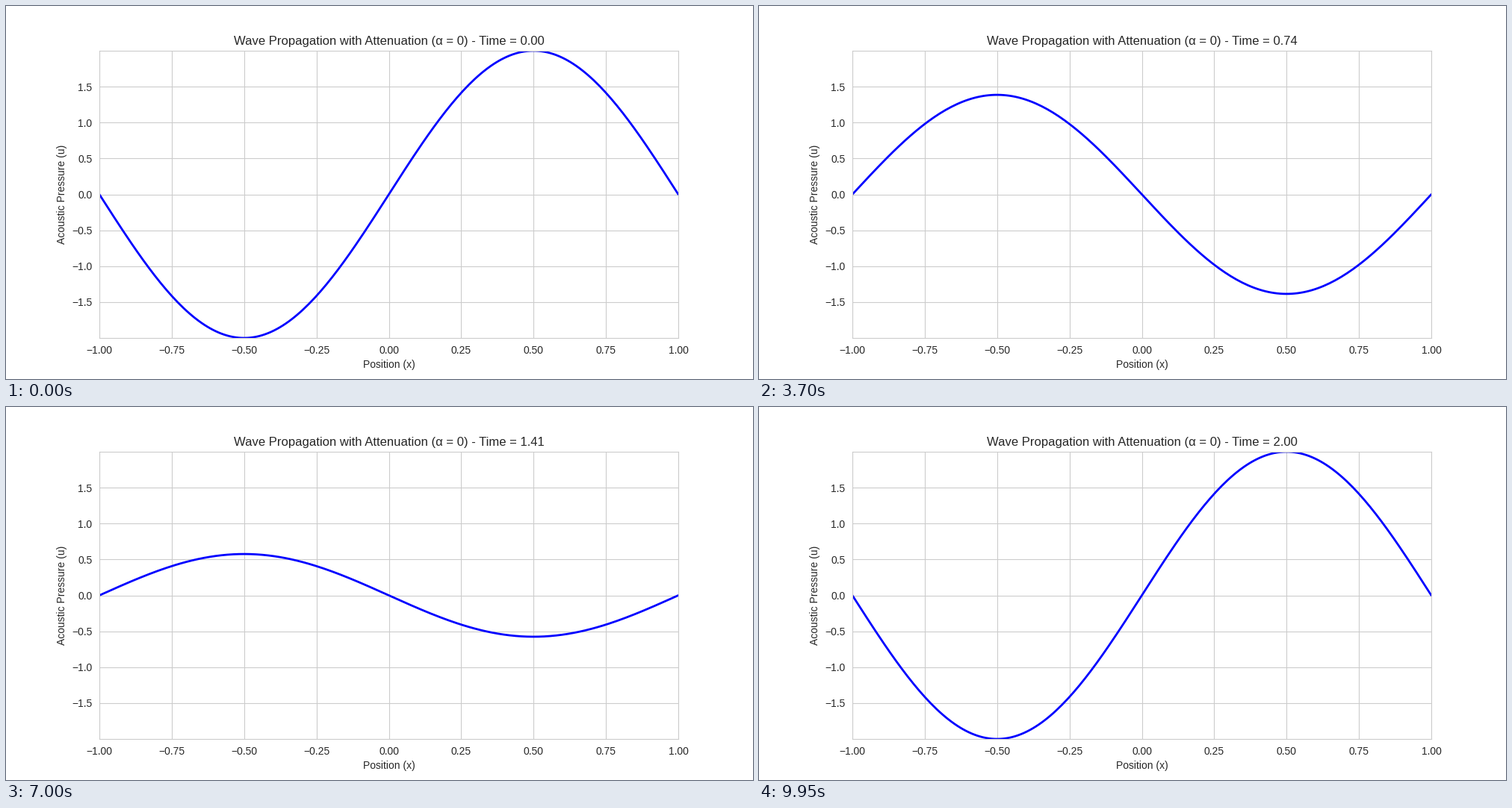
Recreate the animation shown at these times as a matplotlib script. Size 1000 by 500 pixels, loop 10000 ms.

```python
import matplotlib.pyplot as plt
import numpy as np
from matplotlib.animation import FuncAnimation

FRAMES = 200
INTERVAL = 50  # ms
INK = "0.15"
RULE = "0.8"

plt.rcParams.update({
    "font.family": "Liberation Sans",
    "text.color": INK,
    "axes.labelcolor": INK,
    "xtick.color": INK,
    "ytick.color": INK,
    "xtick.bottom": False,
    "ytick.left": False,
    "axes.edgecolor": RULE,
    "axes.axisbelow": True,
    "axes.grid": True,
    "grid.color": RULE,
    "grid.linestyle": "-",
    "lines.solid_capstyle": "round",
})

x = np.linspace(-1, 1, 200)
times = np.linspace(0, 2, FRAMES)


def pressure(t):
    """Standing wave: two equal waves travelling in opposite directions."""
    return np.sin(np.pi * (x - t)) + np.sin(np.pi * (x + t))


fig, ax = plt.subplots(figsize=(10, 5), dpi=100)
peak = pressure(0).max()
ax.set_xlim(-1, 1)
ax.set_ylim(-peak, peak)
ax.set_xlabel("Position (x)")
ax.set_ylabel("Acoustic Pressure (u)")
title = ax.set_title("")
line, = ax.plot([], [], color="blue", lw=2)


def update(frame):
    t = times[frame]
    line.set_data(x, pressure(t))
    title.set_text(f"Wave Propagation with Attenuation (α = 0) - Time = {t:.2f}")
    return line, title


anim = FuncAnimation(fig, update, frames=FRAMES, interval=INTERVAL,
                     repeat=True, repeat_delay=0, blit=False)
plt.show()
```
